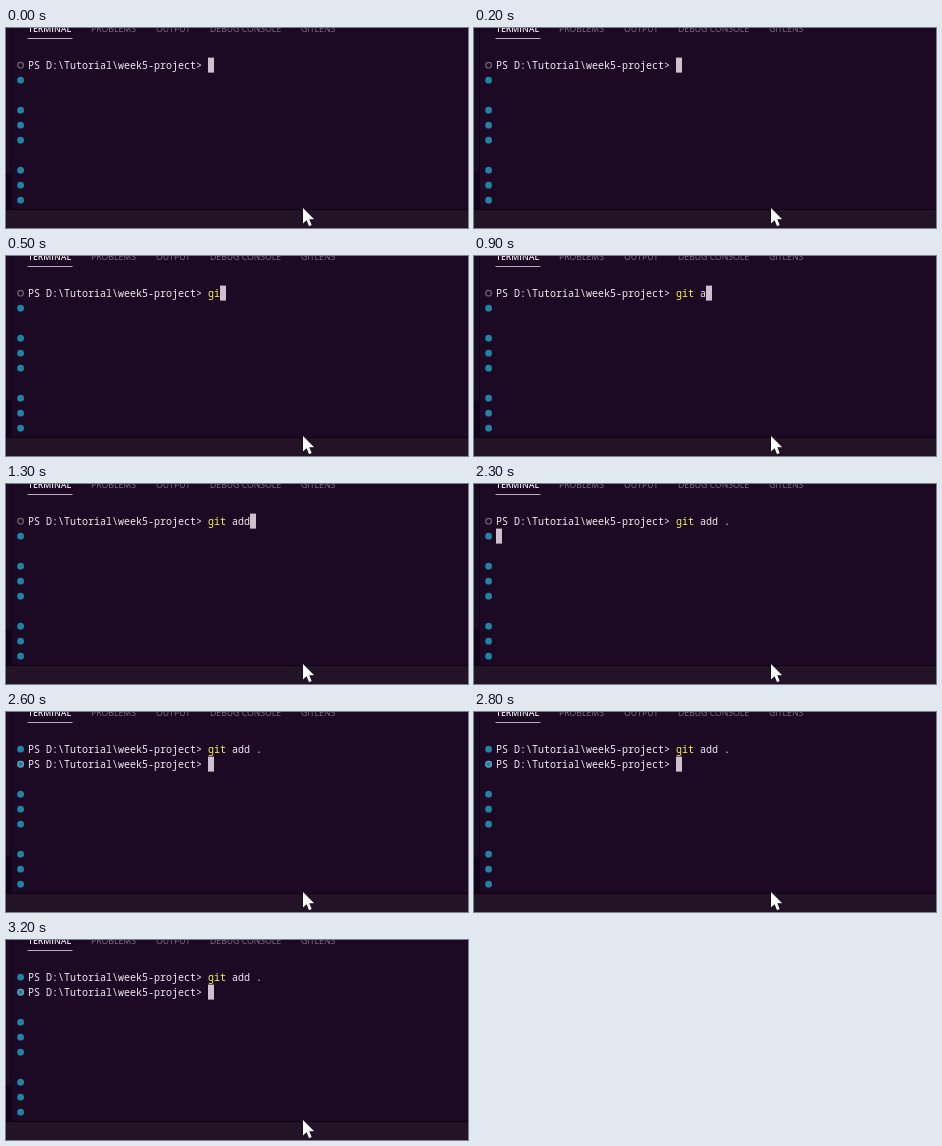
An HTML page for the animation above (3300 ms loop, 462x200 px).

```html
<!DOCTYPE html>
<html lang="en">
<head>
<meta charset="utf-8">
<title>Terminal</title>
<style>
  html, body { margin: 0; width: 100%; height: 100%; overflow: hidden; background: #1c0a24; }
  svg { display: block; width: 462px; height: 200px; }
  .tabs { font: 8.7px "Open Sans", "Noto Sans", sans-serif; fill: #806f87; }
  .tabs .active { font-weight: 600; fill: #efe9f1; }
  .term { font: 500 10px "Noto Sans Mono", "DejaVu Sans Mono", monospace; fill: #f1ebf3; white-space: pre; }
  .command { fill: #f8f552; }
  .dot { fill: #2183a3; }
  .ring { fill: none; stroke: #6f6575; stroke-width: 1.2; }
</style>
</head>
<body>
<svg viewBox="0 0 462 200">
  <rect width="462" height="200" fill="#1c0a24"/>
  <rect width="5" height="145" fill="#1d0b25"/>
  <rect y="145" width="5" height="36" fill="#12031a"/>
  <path d="M5.5 0V181" stroke="#12041a"/>
  <rect y="181" width="462" height="19" fill="#221326"/>
  <path d="M0 181.5H462" stroke="#0c0310"/>

  <g class="tabs">
    <text x="22" y="4" class="active">TERMINAL</text>
    <text x="85" y="4">PROBLEMS</text>
    <text x="150" y="4">OUTPUT</text>
    <text x="204" y="4">DEBUG CONSOLE</text>
    <text x="295" y="4">GITLENS</text>
  </g>
  <path d="M21.5 10.5H66.5" stroke="#b3a8b7"/>

  <g id="dots"></g>
  <circle id="done" class="dot" cx="14.6" cy="37.2" r="3.4"/>
  <circle id="ring" class="ring" cx="14.6" r="2.8"/>

  <g class="term">
    <text x="22" y="41">PS D:\Tutorial\week5-project&gt; <tspan id="command" class="command"></tspan><tspan id="args"></tspan></text>
    <text id="nextPrompt" x="22" y="56">PS D:\Tutorial\week5-project&gt; </text>
  </g>
  <rect id="caret" width="6" height="15" fill="#cdc1d0"/>

  <path d="M297 180V195.6L300.6 192.3L303 198.2L305.7 197L303.3 191.3H308.2Z"
        fill="#fff" stroke="#0c0310" stroke-width="1" paint-order="stroke"/>
</svg>
<script>
  const LOOP = 3300, CELL = 6, LEFT = 22, PROMPT_CELLS = 30;
  const TEXT = "git add .";
  const KEY_TIMES = [300, 400, 600, 700, 900, 1100, 1200, 1400, 1600];
  const ENTER = 2100, FINISHED = 2600;
  const $ = id => document.getElementById(id);

  $("dots").innerHTML = [52, 82, 97, 112, 142, 157, 172]
    .map(y => `<circle class="dot" cx="14.6" cy="${y + 0.2}" r="3.4"/>`).join("");

  function draw(t) {
    const typed = KEY_TIMES.filter(k => t >= k).length;
    const entered = t >= ENTER, finished = t >= FINISHED;
    const column = finished ? PROMPT_CELLS : entered ? 0 : PROMPT_CELLS + typed;

    $("command").textContent = TEXT.slice(0, Math.min(typed, 3));
    $("args").textContent = TEXT.slice(3, Math.max(typed, 3));
    $("nextPrompt").style.display = finished ? "" : "none";
    $("done").style.display = finished ? "" : "none";
    $("ring").setAttribute("cy", finished ? 52.2 : 37.2);
    $("ring").style.stroke = finished ? "#6f9fb2" : "";
    $("caret").setAttribute("x", LEFT + column * CELL);
    $("caret").setAttribute("y", entered ? 44.6 : 29.6);
  }

  let start;
  function tick(now) {
    start ??= now;
    draw((now - start) % LOOP);
    requestAnimationFrame(tick);
  }
  draw(0);
  requestAnimationFrame(tick);
</script>
</body>
</html>
```
